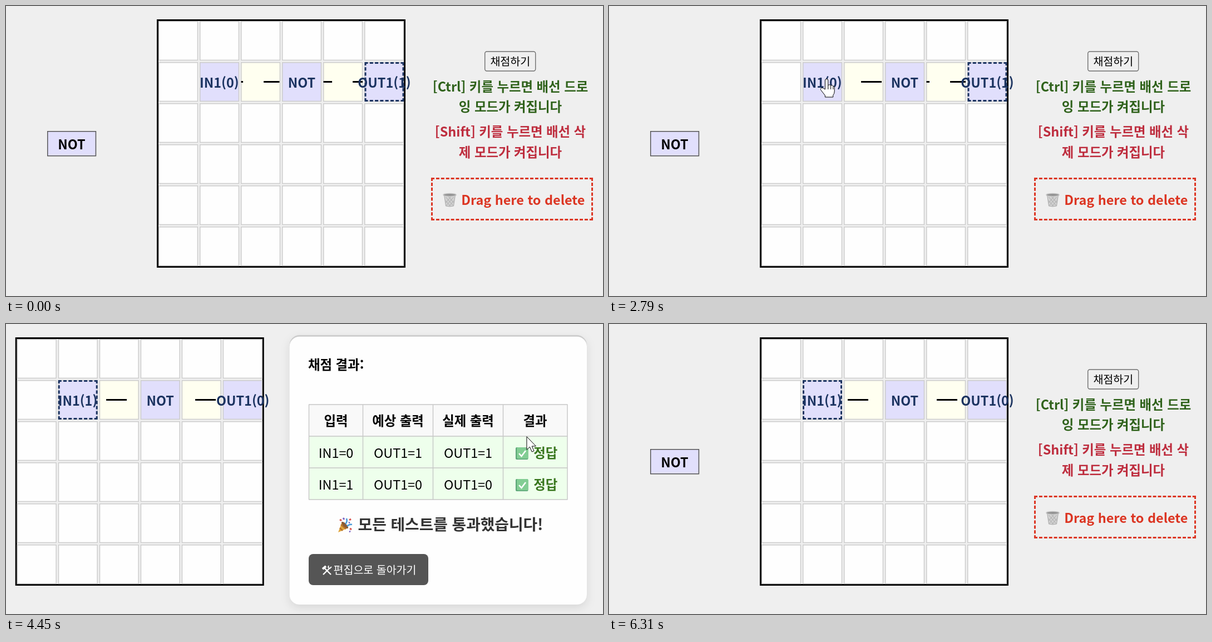
These frames come from a looping animation (1073x522 px, 6340 ms). An HTML page:

```html
<!DOCTYPE html>
<html lang="ko">
<head>
<meta charset="utf-8">
<title>NOT gate exercise</title>
<style>
  html, body { margin: 0; width: 100%; height: 100%; overflow: hidden; background: #efefef; }
  svg { display: block; }
  text { font: 23.4px "Noto Sans CJK KR", "Noto Sans KR", "Noto Sans CJK", sans-serif; text-anchor: middle; }
  .b { font-weight: 700; }
  .small { font-size: 19.5px; }
  .big { font-size: 27.8px; }
  .left { text-anchor: start; }
  .dash { fill: none; stroke-width: 3; }
</style>
</head>
<body>
<svg id="stage" width="1073" height="522" viewBox="0 0 1073 522">
  <defs>
    <filter id="shadow" x="-10%" y="-10%" width="120%" height="125%">
      <feDropShadow dx="0" dy="6" stdDeviation="8" flood-opacity=".1"/>
    </filter>
    <g id="check">
      <rect x="-11" y="-11" width="22.5" height="22" rx="2" fill="#5aa377"/>
      <rect x="-9" y="-11" width="20.5" height="20.5" rx="2" fill="#82cd93"/>
      <path d="M-5 0L-.5 5L7-5" fill="none" stroke="#fff" stroke-width="2.6"/>
    </g>
    <g id="popper">
      <path d="M-12 13L-5-6Q3-3 6 5Z" fill="#e0a53c"/>
      <path d="M-9 5L-4 10M-7-1L2 7" stroke="#b5722b" stroke-width="2.5"/>
      <ellipse cx="0" cy="0" rx="3" ry="8" transform="rotate(-45)" fill="#8a5a35"/>
      <path d="M1-2Q5-6 3-12M4 2Q8-2 13-1" fill="none" stroke="#4b9bd8" stroke-width="2.6"/>
      <path d="M-9-10l3 2M8-9l3-2M9 6l3 2" stroke="#d9534f" stroke-width="3"/>
      <path d="M-3-13l2 3M7-4l2-1M8 11l2 1" stroke="#7a62c0" stroke-width="3"/>
    </g>
    <g id="tools" fill="none" stroke="#fff" stroke-width="2.4">
      <path d="M-7 7L4-4M-6-6L7 7"/>
      <path d="M-8-3L-2-8" stroke-width="4"/>
      <path d="M8-7L5-4L2-6L3-9" stroke-width="1.8"/>
    </g>
  </defs>
  <g id="grid"></g>
  <g id="editor"></g>
  <g id="card"></g>
  <g id="pointer" stroke="#000" stroke-linejoin="round" fill="#fff">
    <path id="arrow" d="M0 0V23.5L5.5 18.5L9.3 27.3L13 25.8L9.3 17.2H16.5Z"/>
    <g id="hand">
      <path d="M-2.6 19V3a2.7 2.7 0 0 1 5.4 0V12c1-2 4.5-1.5 4.8.7c1-1.7 4-1 4.3 1c1.3-.8 2.3.5 2.3 2V23q0 4-2.5 6.5V33H-2.6V30L-10 20.5c-2-3 1.5-5.5 4-3.5z"/>
      <path d="M2.8 12v7M7.6 13v6M11.9 14v5"/>
    </g>
    <circle id="click" cx="-1.5" r="17" fill="#f0e94a" fill-opacity=".78" stroke="none"/>
  </g>
</svg>
<script>
const LOOP = 6340;
const NAVY = '#1b3360', LAVENDER = '#e1dffc', RED = '#dc3522';
const $ = id => document.getElementById(id);
const show = (id, on) => $(id).setAttribute('visibility', on ? 'visible' : 'hidden');
const between = (t, spans) => spans.some(([from, to]) => t >= from && t < to);

const rect = (x, y, w, h, fill, more = '') =>
  `<rect x="${x}" y="${y}" width="${w}" height="${h}" fill="${fill}" ${more}/>`;
const text = (x, y, str, cls = '', fill = '#000', id = '') =>
  `<text x="${x}" y="${y}" class="${cls}" fill="${fill}" id="${id}">${str}</text>`;
// Each side starts its own dash run, so corners stay solid.
const dashBox = (x, y, w, h, gap, color, id = '') =>
  `<path id="${id}" class="dash" stroke="${color}" stroke-dasharray="6 ${gap}" transform="translate(${x} ${y})"
    d="M0 1.5h${w}M0 ${h - 1.5}h${w}M1.5 0v${h}M${w - 1.5} 0v${h}"/>`;
const wire = (id, x, len) =>
  `<path id="${id}" d="M${x} 136.5h${len}" stroke="#000" stroke-width="3" stroke-dasharray="37"/>`;

function buildGrid() {
  const fills = ['#fefefe', LAVENDER, '#fffff0', LAVENDER, '#fffff0', LAVENDER];
  let out = rect(272.5, 25.5, 444, 444, '#efefef', 'stroke="#000" stroke-width="3"');
  for (let row = 0; row < 6; row++)
    for (let col = 0; col < 6; col++)
      out += rect(274.75 + 74 * col, 27.75 + 74 * row, 69.7, 69.7,
        row === 1 ? fills[col] : '#fefefe', 'stroke="#ccc" stroke-width="1.5"');
  $('grid').innerHTML = out + wire('wire1', 422.5, 69) + wire('wire2', 570.5, 70.5) +
    dashBox(348, 101, 71, 71, 3.286, NAVY, 'inBox') + dashBox(644.5, 101, 71, 71, 3.286, NAVY, 'outBox') +
    text(383.3, 146.6, '', 'b', NAVY, 'inText') + text(531.5, 146.6, 'NOT', 'b', NAVY) +
    text(680, 146.6, '', 'b', NAVY, 'outText');
}

function buildEditor() {
  const green = '#2f621b', crimson = '#be2d3e';
  $('editor').innerHTML =
    rect(74.75, 225.75, 86.7, 44, LAVENDER, 'stroke="#555" stroke-width="1.5"') +
    text(118, 257.6, 'NOT', 'b') +
    rect(860.7, 82, 91, 35, '#efefef', 'id="grade" rx="3.5" stroke="#6f6f6f" stroke-width="1.4"') +
    text(906.3, 107, '채점하기', 'small') +
    text(906.5, 153.6, '[Ctrl] 키를 누르면 배선 드로', 'b', green) +
    text(906.5, 190.4, '잉 모드가 켜집니다', 'b', green) +
    text(906.5, 234.8, '[Shift] 키를 누르면 배선 삭', 'b', crimson) +
    text(906.5, 272, '제 모드가 켜집니다', 'b', crimson) +
    dashBox(764, 309, 291, 77, 2.9, RED) +
    `<g transform="translate(797.5 349)">
      <path d="M-10-9H10L7 11Q0 13-7 11Z" fill="#d2d2d2" stroke="#a9a9a9"/>
      <path d="M-7-5L6 10M-2-6L7 5M-8 1L1 11M7-5L-6 10M2-6L-7 5M8 1L-1 11" stroke="#aaa"/>
      <ellipse cy="-9" rx="11.5" ry="2.5" fill="#8f8f8f" stroke="#c4c4c4" stroke-width="1.6"/></g>` +
    text(818.3, 357.6, 'Drag here to delete', 'b left', RED);
}

let cardKey;
function drawCard(rows, done) {
  const key = rows + '/' + done;
  if (key === cardKey) return;
  cardKey = key;
  const columns = [544.5, 641.5, 767.5, 893.5, 1009];
  const centers = [593, 704.5, 830.5, 951];
  const height = 217 + 57 * rows + (done ? 154 : 0);
  const bottom = 182 + 57 * rows;
  let out = `<g filter="url(#shadow)">${rect(509.5, 0, 534.5, height, '#ccc', 'rx="18"')}</g>` +
    rect(509.5, 2.7, 534.5, height - 2.7, '#fefefe', 'rx="18"') +
    text(543, 62.3, '채점 결과:', 'b left') +
    rect(544.5, 125, 464.5, 57, '#f9f9f9') + rect(544.5, 182, 464.5, 57 * rows, '#eeffec');
  ['입력', '예상 출력', '실제 출력', '결과'].forEach((head, i) => out += text(centers[i], 163.3, head, 'b'));
  for (let i = 0; i < rows; i++) {
    const y = 221 + 57 * i;
    [`IN1=${i}`, `OUT1=${1 - i}`, `OUT1=${1 - i}`].forEach((cell, c) => out += text(centers[c], y, cell));
    out += `<use href="#check" x="927" y="${y - 8}"/>` + text(969.7, y, '정답', 'b', '#38761d');
  }
  let lines = columns.map(x => `M${x} 125V${bottom}`).join('');
  for (let y = 125; y <= bottom; y += 57) lines += `M544 ${y}H1009.5`;
  out += `<path d="${lines}" stroke="#c6c6c6" stroke-width="1.4"/>`;
  if (done) out += '<use href="#popper" x="609" y="342"/>' +
    text(799, 351.3, '모든 테스트를 통과했습니다!', 'b big', '#333') +
    rect(544, 394, 215, 56, '#555', 'rx="8"') + '<use href="#tools" x="577" y="424"/>' +
    text(663, 430, '편집으로 돌아가기', 'small', '#fff');
  $('card').innerHTML = out;
  $('card').setAttribute('transform', `translate(0 ${262.5 - height / 2})`);
}

// Rows of [time, ...values], joined by straight lines.
function track(keys, t) {
  let i = 1;
  while (i < keys.length - 1 && t > keys[i][0]) i++;
  const a = keys[i - 1], b = keys[i];
  const k = Math.min(1, Math.max(0, (t - a[0]) / (b[0] - a[0])));
  return a.slice(1).map((v, n) => v + (b[n + 1] - v) * k);
}

const flow = [[0, 0], [1610, 123], [2790, 212], [3490, 265], [3990, 305], [5080, 391], [6310, 484]];
const path = [
  [430, 1072, 515], [660, 1035, 418], [800, 940, 340], [1000, 640, 200], [1220, 401, 131],
  [2480, 401, 131], [2600, 391, 131], [2850, 391, 131], [3050, 640, 134], [3290, 875, 126],
  [3420, 885, 112], [3490, 886, 111], [3990, 888, 110], [4250, 890, 112], [4600, 970, 270],
  [4740, 976, 345], [4950, 870, 460], [5080, 802, 482], [5300, 700, 452], [5580, 690, 450],
  [5700, 790, 475], [5850, 1073, 518]];

function draw(now) {
  const t = now % LOOP;
  const running = between(t, [[3600, 5560]]);
  const high = between(t, [[1690, 2400], [3900, LOOP]]);

  show('editor', !running);
  show('card', running);
  if (running) drawCard(t < 3900 ? 0 : t < 4200 ? 1 : 2, t >= 4200);
  $('grid').setAttribute('transform', `translate(${running ? -254.3 : 0} 0)`);
  $('inText').textContent = `IN1(${+high})`;
  $('outText').textContent = `OUT1(${+!high})`;
  show('inBox', high);
  show('outBox', !high);

  const [shift] = track(flow, t);
  $('wire1').setAttribute('stroke-dashoffset', -(40.5 + shift) % 74);
  $('wire2').setAttribute('stroke-dashoffset', -(52.5 + shift) % 74);

  const [x, y] = track(path, t);
  const present = between(t, [[430, 5850]]);
  const overButton = running && y > 414 && y < 470 && x < 759;
  const pointing = present && (x < 419 || overButton);
  $('pointer').setAttribute('transform', `translate(${x} ${y})`);
  show('arrow', present && !pointing);
  show('hand', pointing);
  show('click', between(t, [[1520, 1690], [2260, 2400], [3520, 3600], [5440, 5560]]));
  $('grade').setAttribute('fill', between(t, [[3350, 3600]]) ? '#e5e5e5' : '#efefef');
  requestAnimationFrame(draw);
}

buildGrid();
buildEditor();
draw(performance.now());
</script>
</body>
</html>
```
